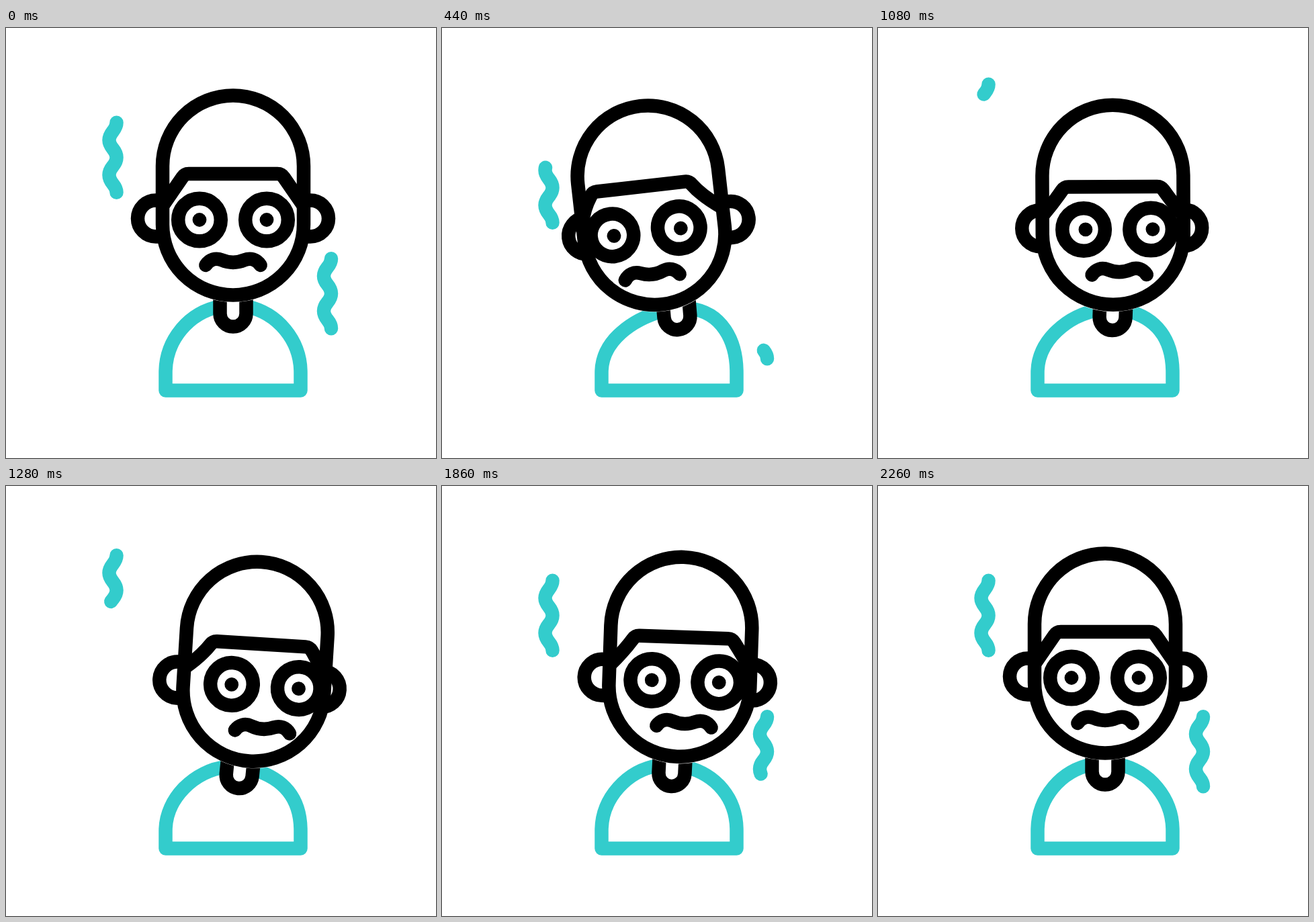
Recreate the animation shown at these times as an HTML page. Size 640 by 640 pixels, loop 2.4 s.

```html
<!DOCTYPE html>
<html lang="en">
<head>
<meta charset="utf-8">
<title>Trembling man</title>
<style>
  html, body { margin: 0; width: 100%; height: 100%; overflow: hidden; background: #fff; }
  svg { display: block; width: 100vw; height: 100vh; }
  .line { fill: none; stroke: #000; stroke-width: 20.5; stroke-linecap: round; stroke-linejoin: round; }
  .teal { stroke: #33cccc; }
  .white { fill: #fff; }
  .halo { fill: none; stroke: #fff; stroke-width: 21.4; }
</style>
</head>
<body>
<svg viewBox="0 0 640 640">
  <defs>
    <path id="skull" d="M-105 -43.5a105 105 0 0 1 210 0V43.5a105 105 0 0 1 -210 0Z"/>
  </defs>
  <path id="waveL" class="line teal" pathLength="100"/>
  <path id="waveR" class="line teal" pathLength="100"/>
  <path id="body" class="line teal"/>
  <path id="neck" class="line white" d="M-19.5 -50V0a19.5 19.6 0 0 0 39 0V-50"/>
  <g id="head">
    <use href="#skull" class="halo"/>
    <path id="earL" class="line white" d="M-90 7.5H-115a27 27 0 0 0 0 54H-90"/>
    <path id="earR" class="line white" d="M90 7.5H115a27 27 0 0 1 0 54H90"/>
    <use href="#skull" class="line white"/>
    <path id="hair" class="line"/>
    <g id="eyes" class="line">
      <circle cx="-50" cy="36.5" r="31.8"/>
      <circle cx="50" cy="36.5" r="31.8"/>
    </g>
    <g id="inner">
      <circle cx="-50" cy="36.5" r="10.4"/>
      <circle cx="50" cy="36.5" r="10.4"/>
      <path class="line" d="M-40.7 104C-35 95.3 -26 92.7 -17 96.3C-5 101.3 5 101.3 17 96.3C26 92.7 35 95.3 40.7 104"/>
    </g>
  </g>
</svg>
<script>
const LOOP = 2400;
const POSES = [0, 620, 1400, 2260];
const $ = id => document.getElementById(id);
const set = (id, name, value) => $(id).setAttribute(name, value);
const ease = p => p * p * (3 - 2 * p);
const ramp = (t, a, b) => ease(Math.min(1, Math.max(0, (t - a) / (b - a))));

// eased interpolation through keyframes
function track(t, times, values) {
  let v = values[0];
  for (let i = 1; i < times.length; i++)
    v += (values[i] - values[i - 1]) * ramp(t, times[i - 1], times[i]);
  return v;
}

// value that is zero at rest, with a left and a right pose
const sway = (t, left, right) => track(t, POSES, [0, left, right, 0]);
const move = (id, x, y, r = 0) => set(id, 'transform', `translate(${x} ${y}) rotate(${r})`);

function wave(id, x, y, from, to) {
  const path = $(id);
  const shown = to - from;
  path.style.display = shown < 0.5 ? 'none' : '';
  path.style.strokeDasharray = `${shown} 300`;
  path.style.strokeDashoffset = -from;
  path.setAttribute('transform', `translate(${x} ${y})`);
}

function drawWaves(t) {
  const back = t >= 860;
  const dy = back ? -66 * (1 - ramp(t, 875, 1765)) : 84 * ramp(t, 0, 840);
  const trim = (outA, outB, inA, inB) => back
    ? [0, 100 * ramp(t, inA, inB)]
    : [100 * ramp(t, outA, outB), 100];
  wave('waveL', 164.5, 140.8 + dy, ...trim(270, 840, 950, 1490));
  wave('waveR', 484, 343.2 + dy, ...trim(0, 560, 1410, 2030));
}

function drawTorso(t) {
  const x = 338 + sway(t, 15, 8.8);
  const y = 425 + sway(t, 5.7, 5.4);
  const r = sway(t, -6, 6.4);
  move('neck', x, y, r);
  const c = Math.cos(r * Math.PI / 180), s = Math.sin(r * Math.PI / 180);
  const at = (px, py) => `${x + px * c - py * s} ${y + px * s + py * c}`;
  set('body', 'd', `M${at(-19.5, -10.6)}C${at(-66.6, -1.2)} 237.5 465 237.5 513V539.5H438.5V513` +
    `C438.5 465 ${at(66.6, -1.2)} ${at(19.5, -10.6)}`);
}

function drawHair(t) {
  const x = sway(t, -15.5, 8.8), y = sway(t, 3.6, 5.7) - 32;
  const side = k => ({
    end: `${105 * k} 16`,
    bend: `${x + 88.5 * k} ${y + 24}`,
    low: `${x + 75.5 * k} ${y + 5.2}`,
    corner: `${x + 72 * k} ${y}`,
    top: `${x + 66 * k} ${y}`
  });
  const l = side(-1), r = side(1);
  set('hair', 'd', `M${l.end}Q${l.bend} ${l.low}Q${l.corner} ${l.top}` +
    `L${r.top}Q${r.corner} ${r.low}Q${r.bend} ${r.end}`);
}

function drawHead(t) {
  move('head', 338 + sway(t, -33.3, 37.6), 249 + sway(t, 18.4, 11.8), sway(t, -8.15, 4.35));
  move('earL', sway(t, 17.8, 0), 0);
  move('earR', 0 + sway(t, 0, -15), 0);

  const fx = sway(t, -16, 19.3), fy = sway(t, 1.7, -0.9);
  move('eyes', fx, fy);
  const dx = track(t, [0, 620, 960, 1460, 1860], [0, 3, 3.6, -1.8, 0]);
  const dy = track(t, [0, 700, 1080, 1500, 1860], [0, 2, 0, 1.3, 0]);
  move('inner', fx + dx, fy + dy);
}

function draw(t) {
  drawWaves(t);
  drawTorso(t);
  drawHead(t);
  drawHair(t);
}

const ripple = 'M0 0C0 12 -11 14 -11 26S0 39.5 0 52S-11 65.5 -11 78S0 92 0 104';
set('waveL', 'd', ripple);
set('waveR', 'd', ripple);

let start = null;
function tick(now) {
  if (start === null) start = now;
  draw((now - start) % LOOP);
  requestAnimationFrame(tick);
}
draw(0);
requestAnimationFrame(tick);
</script>
</body>
</html>
```
